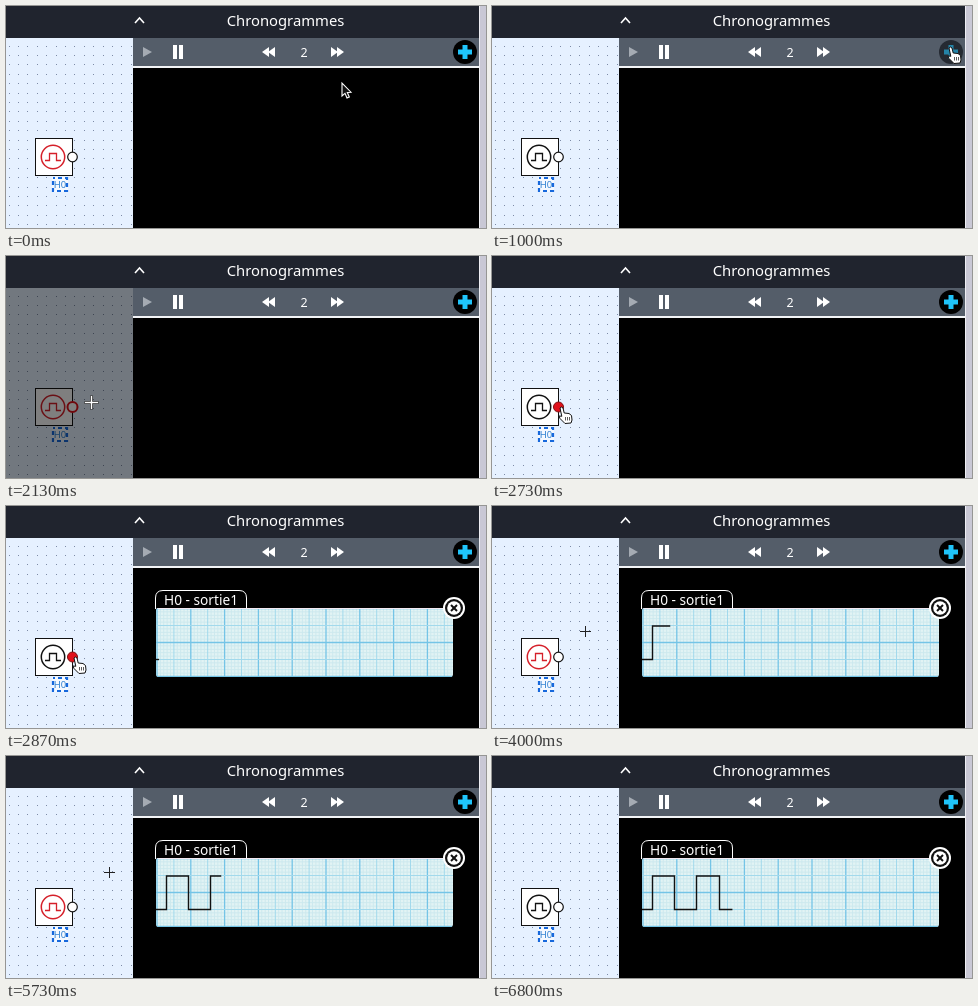
These frames come from a looping animation (480x222 px, 6.87 s). An HTML page with a canvas:

```html
<!DOCTYPE html>
<html lang="fr">
<head>
<meta charset="utf-8">
<title>Chronogrammes</title>
<style>
html, body { margin: 0; width: 100%; height: 100%; overflow: hidden; background: #000; }
canvas { display: block; }
</style>
</head>
<body>
<canvas id="stage" width="480" height="222"></canvas>
<script>
const g = document.getElementById('stage').getContext('2d');
const LOOP = 6870, STEP = LOOP / 103;
const CLICK = 1270, UNDIM = 2600, PANEL = 2730;
const SPEED = 0.0222, FIRST_EDGE = 3185, HALF = 998;
const FONT = '"Noto Sans", "Open Sans", sans-serif';

// time, x, y of the pointer's hot spot
const PATH = [
  [0, 336, 77], [70, 336, 77], [670, 457, 41], [1500, 457, 41],
  [2130, 75, 149], [2200, 75, 149], [2300, 68, 151], [3270, 68, 151],
  [3800, 93, 125], [5500, 93, 125], [5730, 107, 113], [6130, 180, -24]
];

function rect(x, y, w, h, color) {
  g.fillStyle = color;
  g.fillRect(x, y, w, h);
}

function line(points, color, width = 1) {
  g.beginPath();
  points.forEach(([x, y]) => g.lineTo(x, y));
  g.strokeStyle = color;
  g.lineWidth = width;
  g.stroke();
}

function poly(points, fill, stroke, width = 1) {
  g.beginPath();
  points.forEach(([x, y]) => g.lineTo(x, y));
  g.closePath();
  paint(fill, stroke, width);
}

function disc(x, y, r, fill, stroke, width = 1) {
  g.beginPath();
  g.arc(x, y, r, 0, Math.PI * 2);
  paint(fill, stroke, width);
}

function paint(fill, stroke, width) {
  if (fill) { g.fillStyle = fill; g.fill(); }
  if (stroke) { g.strokeStyle = stroke; g.lineWidth = width; g.stroke(); }
}

function text(str, x, y, size, color, align = 'left') {
  g.font = size + 'px ' + FONT;
  g.fillStyle = color;
  g.textAlign = align;
  g.fillText(str, x, y);
}

function pointerAt(t) {
  const i = PATH.findIndex(p => p[0] > t);
  if (i < 0) return null;
  const [t0, x0, y0] = PATH[i - 1], [t1, x1, y1] = PATH[i];
  const k = (t - t0) / (t1 - t0);
  const e = t0 === 5500 || t0 === 5730 ? k : k * k * (3 - 2 * k);
  return [x0 + (x1 - x0) * e, y0 + (y1 - y0) * e];
}

const isHigh = t => Math.floor((t - FIRST_EDGE) / HALF) % 2 === 0;

function circuit(t, dim, hot) {
  rect(0, 32, 127, 190, '#e6f1ff');
  for (let y = 39.5; y < 222; y += 9.4)
    for (let x = 2.5; x < 127; x += 9.4)
      rect(Math.round(x), Math.round(y), 1, 1, '#7d8ba6');

  rect(29, 132, 38, 38, '#fff');
  g.strokeStyle = '#111';
  g.lineWidth = 1;
  g.strokeRect(29.5, 132.5, 37, 37);
  const ink = isHigh(t) ? '#d5202a' : '#111';
  disc(47, 151, 11.7, null, ink, 1.5);
  line([[39, 154.5], [43.5, 154.5], [43.5, 147.5], [50.5, 147.5], [50.5, 154.5], [55, 154.5]], ink, 1.3);

  if (hot) disc(66.5, 151, 5, '#e0101a', '#7a1010');
  else if (dim) disc(66.5, 151, 5, '#fff', '#e0101a', 2);
  else disc(66.5, 151, 4.8, '#fff', '#111', 1.2);

  rect(46, 171, 16, 15, '#f4f9ff');
  g.setLineDash([4, 3]);
  g.lineDashOffset = 2;
  g.strokeStyle = '#1668dc';
  g.lineWidth = 2.2;
  g.strokeRect(47, 172, 14, 13);
  g.setLineDash([]);
  text('H0', 54, 182, 9.5, '#2b7fd0', 'center');

  if (dim) rect(0, 32, 127, 190, 'rgba(0,0,0,.5)');
}

function skip(x, dir) {
  for (const s of [0, 6])
    poly([[x + dir * s, 41], [x + dir * (s + 7), 46], [x + dir * s, 51]], '#fff');
}

function toolbar(hover) {
  rect(0, 0, 473, 32, '#20242e');
  line([[129, 17], [133.5, 12], [138, 17]], '#fff', 1.6);
  text('Chronogrammes', 279.5, 19.5, 14.8, '#fff', 'center');
  rect(127, 32, 346, 28, '#545d69');
  rect(127, 60, 346, 2, '#f2f4f6');
  poly([[137, 41], [146, 46], [137, 51]], '#a5abb3');
  rect(167, 39, 4, 14, '#fff');
  rect(173, 39, 4, 14, '#fff');
  skip(269, -1);
  skip(325, 1);
  text('2', 298, 50.5, 12.5, '#fff', 'center');
  disc(459, 46, 12, hover ? '#252a32' : '#000');
  const blue = hover ? '#2584a8' : '#1fc4fa';
  rect(452, 43.5, 14, 5, blue);
  rect(456.5, 39, 5, 14, blue);
}

function grid() {
  const x0 = 150, y0 = 102, w = 297, h = 69;
  g.save();
  g.beginPath();
  g.roundRect(x0, y0, w, h, 3);
  g.clip();
  rect(x0, y0, w, h, '#e2f3f4');
  const rule = (n, x) => {
    const color = n % 10 === 0 ? '#74c4e6' : n % 5 === 0 ? '#a2d9ec' : '#cde9ee';
    return [color, x, n % 10 === 0 ? 1.3 : 1];
  };
  for (const major of [false, true]) {
    for (let n = 0; n < 88; n++) {
      if ((n % 5 === 0) !== major) continue;
      const [c, x, wd] = rule(n, x0 + 1 + n * 3.38);
      line([[x, y0], [x, y0 + h]], c, wd);
    }
    for (let n = 0; n <= 20; n++) {
      if ((n % 5 === 0) !== major) continue;
      const [c, y, wd] = rule(n, y0 + 0.5 + n * 3.4);
      line([[x0, y], [x0 + w, y]], c, wd);
    }
  }
  rect(x0, y0, w, 1, '#f3e9f2');
  g.restore();
}

function wave(t) {
  const head = 150 + (t - PANEL) * SPEED;
  const points = [[150, 153.5]];
  let y = 153.5;
  // the trace shows each edge one step after the clock
  for (let e = FIRST_EDGE; e < t - STEP * 0.5; e += HALF) {
    const x = Math.round(150 + (e - PANEL) * SPEED) + 0.5;
    points.push([x, y]);
    y = y > 130 ? 120 : 153.5;
    points.push([x, y]);
  }
  points.push([Math.max(head, 151), y]);
  line(points, '#111', 1.4);
}

function chart(t) {
  g.beginPath();
  g.moveTo(149.5, 103);
  g.lineTo(149.5, 92);
  g.quadraticCurveTo(149.5, 84.5, 157, 84.5);
  g.lineTo(233, 84.5);
  g.quadraticCurveTo(240.5, 84.5, 240.5, 92);
  g.lineTo(240.5, 103);
  paint('#000', '#fff', 1);
  text('H0 - sortie1', 158, 98.5, 13.7, '#fff');
  grid();
  wave(t);
  disc(448, 102, 11, '#fff');
  disc(448, 102, 9, '#111');
  disc(448, 102, 6.8, '#fff');
  line([[445, 99], [451, 105]], '#111', 2);
  line([[451, 99], [445, 105]], '#111', 2);
}

function arrow(x, y) {
  poly([[x, y], [x, y + 13], [x + 3, y + 10.3], [x + 5, y + 15], [x + 7.3, y + 14],
    [x + 5.3, y + 9.5], [x + 9, y + 9.2]], '#111', '#fff', 1.1);
}

function hand(x, y) {
  poly([[x, y + 1], [x + 1.5, y], [x + 3, y + 1], [x + 4.2, y + 6], [x + 9, y + 6.5],
    [x + 11.5, y + 8.5], [x + 12, y + 13], [x + 11, y + 16], [x + 5, y + 16.5],
    [x, y + 11.5], [x - 1, y + 9], [x + 1.8, y + 9.3]], '#fff', '#111', 1);
  for (const d of [5.5, 7.5, 9.5]) line([[x + d, y + 10], [x + d, y + 13.5]], '#333', 0.8);
}

function cross(x, y, dim) {
  x = Math.round(x) + 0.5;
  y = Math.round(y) + 0.5;
  const r = dim ? 6.5 : 5.5;
  const pass = (color, width, len) => {
    line([[x - len, y], [x + len, y]], color, width);
    line([[x, y - len], [x, y + len]], color, width);
  };
  if (dim) { pass('#333', 3, r + 0.5); pass('#fff', 1.4, r); }
  else pass('#222', 1, r);
}

function draw(t) {
  const dim = t >= CLICK && t < UNDIM;
  const p = pointerAt(t);
  const near = (x, y, r) => p && Math.hypot(p[0] - x, p[1] - y) < r;
  const onPlus = near(459, 46, 12);
  const onPort = t > 2200 && near(66.5, 151, 6);

  rect(0, 0, 480, 222, '#000');
  rect(473, 0, 7, 222, '#c9c8d5');
  rect(473, 0, 1, 222, '#eeeef3');
  circuit(t, dim, onPort);
  toolbar(onPlus);
  if (t >= PANEL) chart(t);

  if (!p) return;
  if (onPlus || onPort) hand(p[0], p[1]);
  else if (p[0] < 127 && p[1] > 32) cross(p[0], p[1], dim);
  else arrow(p[0], p[1]);
}

const start = performance.now();
function tick() {
  const t = (performance.now() - start) % LOOP;
  draw(Math.floor(t / STEP + 0.05) % 103 * STEP);
  requestAnimationFrame(tick);
}
tick();
</script>
</body>
</html>
```
